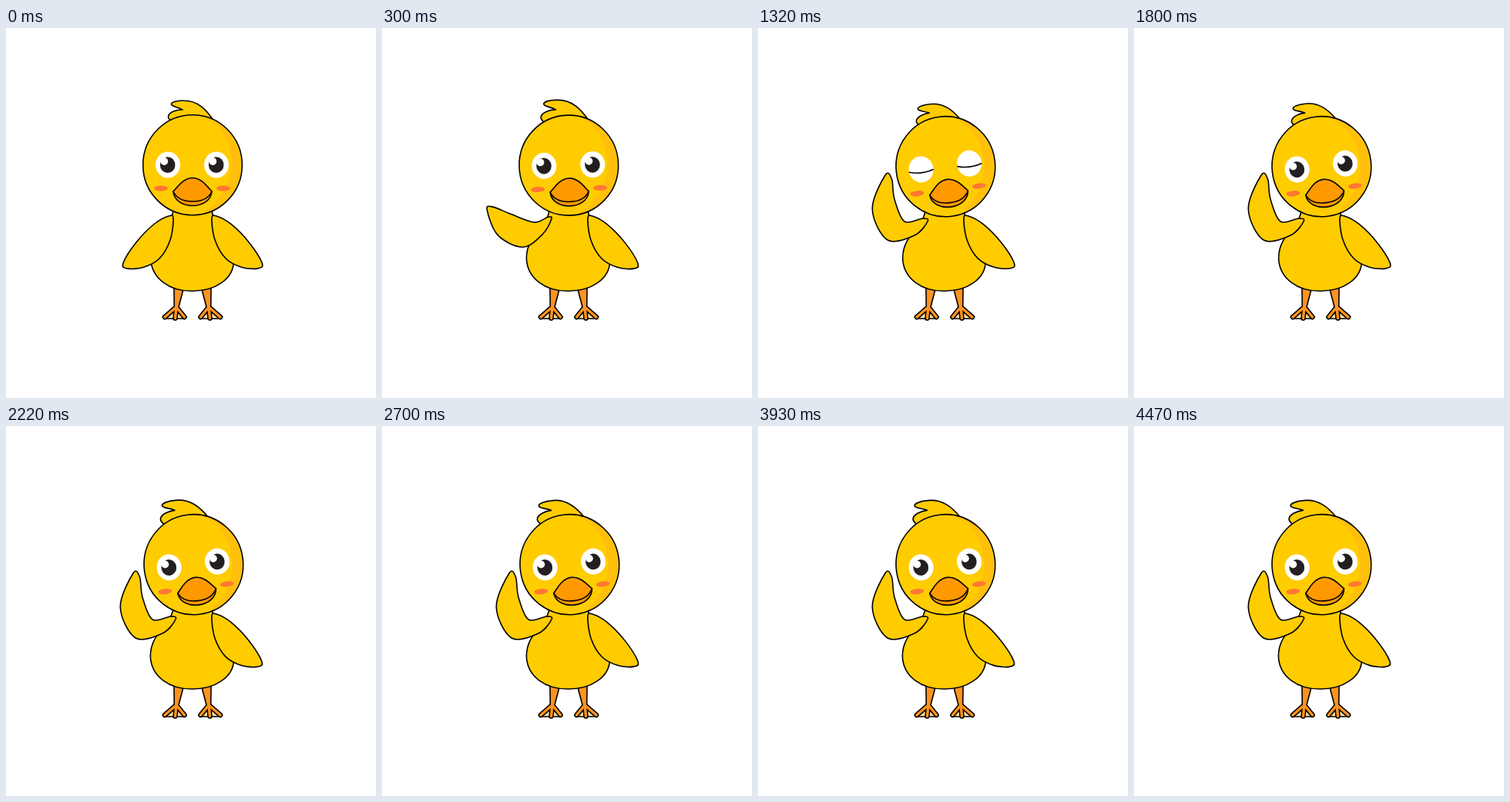
These frames come from a looping animation (480 px wide and 480 px high, 4500 ms). An HTML page:

```html
<!DOCTYPE html>
<html lang="en">
<head>
<meta charset="utf-8">
<title>Waving duckling</title>
<style>
html, body { margin: 0; width: 100%; height: 100%; overflow: hidden; background: #fff; }
svg { display: block; width: 100%; height: 100%; }
.line { stroke: #000; stroke-width: 1.6; stroke-linejoin: round; stroke-linecap: round; }
.skin { fill: #fc0; }
.beak { fill: #f90; }
.toes { fill: none; stroke-linecap: round; }
</style>
</head>
<body>
<svg viewBox="0 0 480 480">
  <defs>
    <path id="toes" d="M221 362 L206 375 M221 362 L219.500 376.500 M221 362 L231.500 375"/>
    <g id="leg">
      <path class="line" fill="#ffe3a3" d="M206 377 Q219 360 231 377 Z"/>
      <use href="#toes" class="toes" stroke="#000" stroke-width="6.600"/>
      <path class="line" fill="#ff931e" d="M218.300 363 L217.900 334 L230.800 336 L223.700 363"/>
      <use href="#toes" class="toes" stroke="#ff931e" stroke-width="3.500"/>
    </g>
    <g id="eye">
      <ellipse cx="210" cy="177.500" rx="16" ry="17" fill="#fff"/>
      <g class="open">
        <ellipse cx="209.700" cy="177.700" rx="9.800" ry="10.400" fill="#231f20"/>
        <circle cx="205.300" cy="173" r="4.900" fill="#fff"/>
      </g>
      <path class="shut line" fill="none" d="M194.500 179.500 Q210 184.500 225.500 179.500"/>
    </g>
  </defs>

  <use href="#leg"/>
  <use href="#leg" transform="matrix(-1 0 0 1 484 0)"/>
  <path id="body" class="line skin" d="M217 234 C217 258 188 266 187.500 298 C188 325 212 341.300 241.500 341.300 C271 341.300 295.500 326 295.500 302 C295 268 267 258 267 234 Z"/>
  <path id="arm" class="line skin"/>
  <path id="wing" class="line skin"/>

  <g id="head">
    <path id="hair" class="line skin" d="M269 120 C260 106 249 94.300 231 94.300 C222 94 214 96 214.500 99 C215 102 222 102 229 106 C221 106 211 109 210.500 115 C210.500 117 212 119 215 122 Z"/>
    <ellipse class="skin" cx="242" cy="177.700" rx="64.300" ry="65"/>
    <path fill="#ffbf0b" d="M256 114.500 C284 128 293 155 292 178 C291 206 276 226 254 241 A64.300 65 0 0 0 256 114.500 Z"/>
    <ellipse class="line" fill="none" cx="242" cy="177.700" rx="64.300" ry="65"/>
    <use href="#eye"/>
    <use href="#eye" x="63"/>
    <ellipse cx="201" cy="208" rx="9" ry="3.500" fill="#ff7733"/>
    <ellipse cx="282" cy="208" rx="9" ry="3.500" fill="#ff7733"/>
    <path class="line beak" d="M217 212 C218 225 231 230.500 242 230.500 C253 230.500 266 225 267 212 Z"/>
    <path class="line beak" d="M217 212 C223 206 230 194.500 242 194.500 C254 194.500 261 206 267 212 C263 221 253 225 242 225 C231 225 221 221 217 212 Z"/>
  </g>
</svg>
<script>
const LOOP = 4500, STEP = 30, TURN = 93 * Math.PI / 180;
const SHOULDER = [217, 247];

// Key points of the arm, from the shoulder round the tip and back
const hanging = [[217, 247], [211, 244], [192, 254.5], [169, 278], [152, 305],
  [157, 312], [178, 310.5], [199, 299], [213, 275]];
const raised = [[220, 251], [214, 247], [190, 251], [177, 222], [173.5, 196],
  [165, 191], [148.3, 235], [168, 275], [203, 269]];

const get = id => document.getElementById(id);
const mix = (a, b, k) => a + (b - a) * k;
const ease = k => { k = Math.min(1, Math.max(0, k)); return k * k * (3 - 2 * k); };

function spin([x, y], angle) {
  const [px, py] = SHOULDER, c = Math.cos(angle), s = Math.sin(angle);
  return [px + (x - px) * c - (y - py) * s, py + (x - px) * s + (y - py) * c];
}

// Closed smooth curve through the points (Catmull-Rom)
function smooth(points) {
  const n = points.length;
  const at = i => points[(i + n) % n];
  const handle = (i, side) =>
    at(i).map((v, axis) => v + side * (at(i + 1)[axis] - at(i - 1)[axis]) / 6);
  const curves = points.map((_, i) =>
    "C" + [handle(i, 1), handle(i + 1, -1), at(i + 1)].join(" "));
  return "M" + at(0) + curves.join("") + "Z";
}

// Raised pose turned back to hang down, so the swing is a pure rotation
const bent = raised.map(p => spin(p, -TURN));

const armPath = k => smooth(hanging.map(([x, y], i) =>
  spin([mix(x, bent[i][0], k), mix(y, bent[i][1], k)], TURN * k)));

const scaleAt = (x, y, sx, sy) =>
  `translate(${x} ${y}) scale(${sx} ${sy}) translate(${-x} ${-y})`;

const move = (id, transform) => get(id).setAttribute("transform", transform);

const show = (name, on) => document.querySelectorAll("." + name)
  .forEach(el => el.style.display = on ? "" : "none");

function draw(t) {
  const sway = Math.cos(2 * Math.PI * (t - 600) / 1800);
  const lift = sway + 0.5;
  const tilt = ease(t / 1000);
  const shut = t >= 1260 && t < 1410;

  get("arm").setAttribute("d", armPath(ease(t / 540)));
  move("head", `translate(${1.4 * tilt} ${2 * tilt}) rotate(${-7 * tilt} 242 178)`);
  move("hair", scaleAt(266, 119, 1 + 0.055 * lift, 1 + 0.07 * lift));
  move("body", scaleAt(241.5, 341, 1 + 0.004 * sway, 1));
  move("wing", `rotate(${0.3 * sway} 268 246)`);
  show("open", !shut);
  show("shut", shut);
}

get("wing").setAttribute("d", smooth(hanging.map(([x, y]) => [484 - x, y])));

function tick() {
  const t = performance.now() % LOOP;
  draw(Math.floor(t / STEP) * STEP);
  requestAnimationFrame(tick);
}
tick();
</script>
</body>
</html>
```
